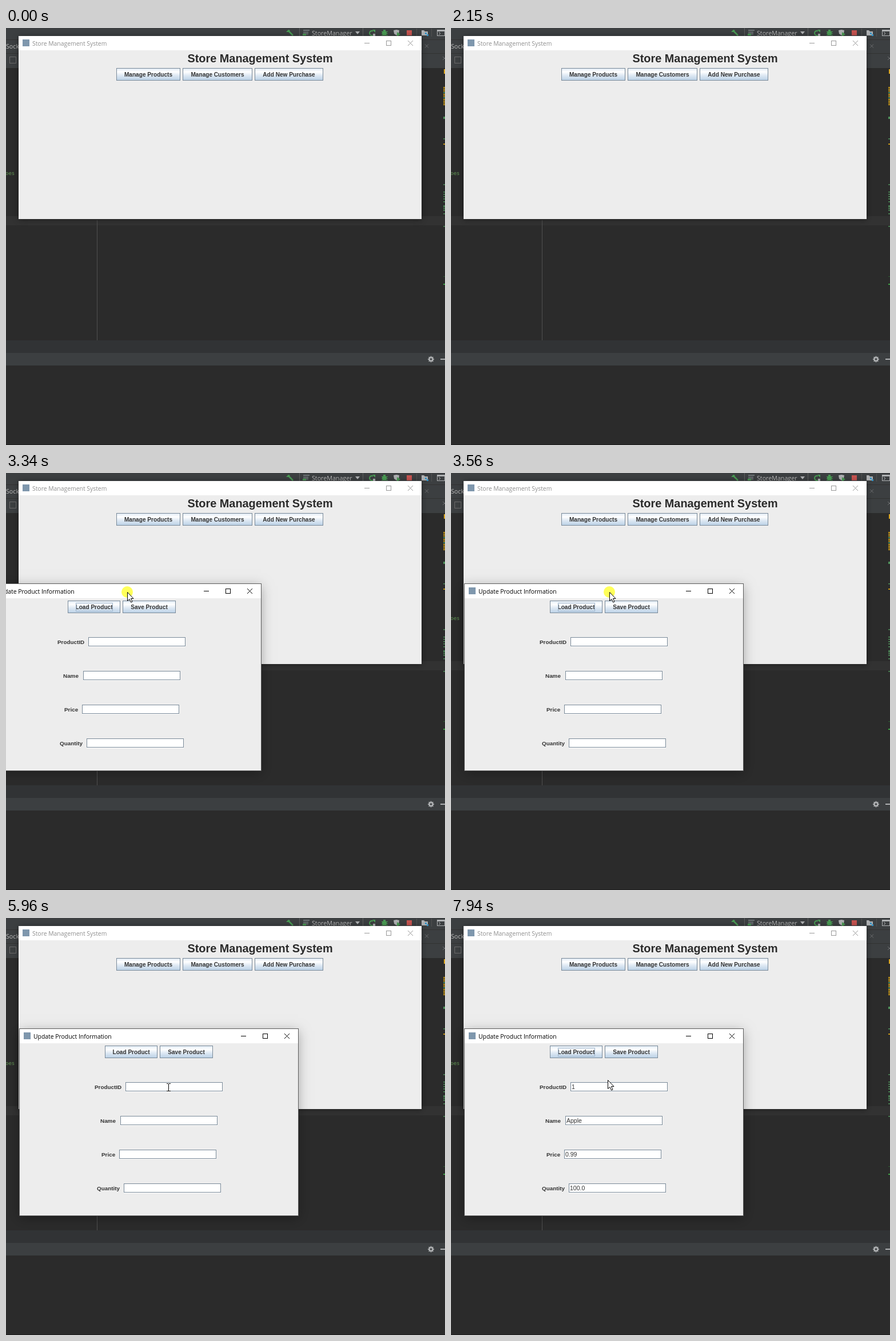
Animation, 768 px wide and 729 px high, one loop 8000 ms. Source, as an HTML page with a canvas:

```html
<!DOCTYPE html>
<html lang="en">
<head>
<meta charset="utf-8">
<title>Store Management System</title>
<style>
html, body { margin: 0; width: 100%; height: 100%; overflow: hidden; background: #2b2b2b; }
canvas { display: block; }
</style>
</head>
<body>
<canvas id="stage" width="768" height="729"></canvas>
<script>
const ctx = document.getElementById('stage').getContext('2d');
const LOOP = 8000;
const SANS = '"Open Sans", sans-serif';
const ARIAL = '"Liberation Sans", Arial, sans-serif';

// time, shape, x, y (tip of the arrow, centre of the beam)
const POINTER = [
  [0, ''],
  [180, 'beam', 485, 460], [280, 'beam', 468, 416],
  [480, 'beam', 398, 350], [600, 'arrow', 292, 254], [710, 'arrow', 229, 212],
  [920, 'arrow', 234, 187], [1030, 'arrow', 249, 134], [1140, 'arrow', 263, 89], [1250, 'arrow', 267, 78],
  [1940, 'arrow', 190, 112], [2050, 'beam', 13, 176], [2150, ''],
  [3010, 'arrow', -7, 173], [3130, 'arrow', 109, 208], [3340, 'arrow', 212, 208],
  [3450, 'arrow', 260, 208], [3560, 'arrow', 277, 208],
  [3780, 'arrow', 279, 225], [3880, 'arrow', 282, 252], [3990, 'arrow', 284, 277], [4100, 'beam', 285, 296],
  [6290, 'arrow', 268, 277], [6400, 'arrow', 240, 254], [6510, 'arrow', 220, 239], [6630, 'arrow', 216, 236],
  [7280, 'arrow', 217, 238], [7390, 'arrow', 222, 243], [7500, 'arrow', 234, 252], [7610, 'arrow', 250, 265],
  [7720, 'arrow', 263, 276], [7830, 'arrow', 271, 282], [7940, 'arrow', 274, 283]
];
// time, left, top of the product form
const FORM = [
  [0, -600, 159], [3010, -260, 159], [3130, -144, 194],
  [3340, -41, 194], [3450, 7, 194], [3560, 24, 194]
];

const at = (rows, t) => rows.filter(r => r[0] <= t).pop();
const within = (t, a, b) => t >= a && t < b;

function box(x, y, w, h, color) {
  ctx.fillStyle = color;
  ctx.fillRect(x, y, w, h);
}

function frame(x, y, w, h, color, width = 1) {
  ctx.strokeStyle = color;
  ctx.lineWidth = width;
  ctx.strokeRect(x + 0.5, y + 0.5, w - 1, h - 1);
}

function text(str, x, y, font, color, align = 'left') {
  ctx.font = font;
  ctx.fillStyle = color;
  ctx.textAlign = align;
  ctx.fillText(str, x, y);
}

function path(points, color, width, closed) {
  ctx.beginPath();
  points.forEach(([x, y]) => ctx.lineTo(x, y));
  if (closed) ctx.closePath();
  if (width) {
    ctx.strokeStyle = color;
    ctx.lineWidth = width;
    ctx.stroke();
  } else {
    ctx.fillStyle = color;
    ctx.fill();
  }
}

function disc(x, y, r, color) {
  ctx.fillStyle = color;
  ctx.beginPath();
  ctx.arc(x, y, r, 0, Math.PI * 2);
  ctx.fill();
}

function cross(x, y, r, color) {
  path([[x - r, y - r], [x + r, y + r]], color, 1);
  path([[x + r, y - r], [x - r, y + r]], color, 1);
}

function drawToolbar() {
  const green = '#499c54', grey = '#afb1b3';
  box(0, 0, 768, 70, '#3c3f41');
  box(0, 20, 768, 1, '#323232');
  box(0, 44, 768, 1, '#323232');

  path([[490, 7], [494, 3], [497, 4], [495, 7]], green);
  path([[494, 5], [502, 13]], green, 2.5);

  frame(513, -6, 112, 23, '#5e6060');
  box(520, 3, 11, 2, '#6e7476');
  box(520, 6, 9, 6, '#5c6264');
  box(519, 10, 6, 3, green);
  text('StoreManager', 535, 13, '10.7px ' + SANS, '#bbbbbb');
  path([[611, 6], [619, 6], [615, 11]], grey);

  ctx.strokeStyle = green;
  ctx.lineWidth = 2;
  ctx.beginPath();
  ctx.arc(640, 9, 4, 1.2, 5.2);
  ctx.stroke();
  path([[641, 3], [646, 3], [646, 8]], green);
  box(642, 10, 4, 4, grey);

  disc(662, 9, 4, green);
  for (const y of [6, 9, 12]) box(657, y, 11, 1, green);
  box(660, 3, 4, 2, green);

  path([[678, 4], [683, 3], [688, 4], [687, 10], [683, 13], [679, 10]], grey);
  path([[684, 7], [690, 11], [684, 15]], green);

  box(701, 4, 9, 9, '#c75450');
  box(718, 1, 1, 14, '#515151');
  path([[727, 4], [731, 4], [733, 6], [738, 6], [738, 13], [727, 13]], grey);
  box(733, 8, 3, 3, '#3592c4');
  box(736, 11, 3, 3, '#3592c4');
  box(744, 1, 1, 14, '#515151');
  frame(754, 3, 14, 11, grey);
  box(754, 3, 14, 3, grey);
  path([[757, 7], [760, 9.5], [757, 12]], grey, 1);

  text('Socke', 0, 36, '10.7px ' + SANS, '#bbbbbb');
  frame(6, 50, 12, 12, '#6b6b6b');
  cross(736, 31.5, 3, '#6e7072');
  cross(767, 53, 3, '#6e7072');
}

function drawEditor() {
  box(0, 70, 768, 476, '#2b2b2b');
  box(0, 329, 768, 16, '#323232');
  box(159, 336, 1, 210, '#505050');
  text('oes', -1, 257, '9px "DejaVu Sans Mono", monospace', '#629755');

  const orange = '#be9117', green = '#4f8f5a';
  box(766, 72, 2, 8, '#d9a520');
  for (let i = 0; i < 11; i++) box(765, 103 + i * 3, 3, 2, i === 3 || i === 6 ? green : orange);
  box(765, 155, 3, 4, green);
  box(765, 202, 3, 2, orange);
  for (const y of [193, 273, 286, 290, 294, 298, 303, 310, 312, 315, 318, 324, 346]) box(765, y, 3, 1.5, green);
  box(765, 434, 3, 1, '#2f5f35');
  box(765, 447, 3, 2, '#3fa045');

  box(0, 546, 768, 22, '#313335');
  box(0, 568, 768, 22, '#3c3f41');
  box(0, 590, 768, 139, '#2b2b2b');
  box(0, 728, 768, 1, '#1c1c1c');

  for (let i = 0; i < 4; i++) {
    const a = i * Math.PI / 4, c = Math.cos(a) * 5.3, s = Math.sin(a) * 5.3;
    path([[743.5 - c, 579 - s], [743.5 + c, 579 + s]], '#afb1b3', 2);
  }
  disc(743.5, 579, 4, '#afb1b3');
  disc(743.5, 579, 1.8, '#3c3f41');
  box(760, 578, 8, 2, '#afb1b3');
}

function drawWindow(x, y, w, h, title, active) {
  ctx.save();
  ctx.shadowColor = active ? 'rgba(0,0,0,.32)' : 'rgba(0,0,0,.4)';
  ctx.shadowBlur = active ? 20 : 10;
  ctx.shadowOffsetY = active ? 4 : 1;
  box(x, y, w, h, '#ededed');
  ctx.restore();
  box(x, y, w, 25, '#ffffff');
  if (active) frame(x - 1, y - 1, w + 2, h + 2, '#5c5c5c');

  const ink = active ? '#000000' : '#999999';
  box(x + 7, y + 6, 12, 12, '#7f97ad');
  text(title, x + 24, y + 17, '10.4px ' + SANS, active ? '#000000' : '#8f8f8f');
  const r = x + w;
  box(r - 100, y + 12, 9, 1, ink);
  frame(r - 62, y + 8, 9, 9, ink);
  cross(r - 19.5, y + 12.5, 4.5, ink);
}

function drawButton(x, y, w, label, { hover, pressed, focus } = {}) {
  const h = 22;
  const fill = ctx.createLinearGradient(0, y, 0, y + h);
  [[0, '#dde8f3'], [0.3, '#ffffff'], [0.6, '#dde8f3'], [1, '#b8cfe5']].forEach(s => fill.addColorStop(...s));
  box(x, y, w, h, pressed ? '#b8cfe5' : fill);
  frame(x, y, w, h, '#7a8a99');
  if (hover) {
    frame(x, y, w, h, '#8499b0');
    frame(x + 1, y + 1, w - 2, h - 2, '#8ea9c6');
  }
  text(label, x + w / 2, y + 15, 'bold 10.1px ' + ARIAL, '#333333', 'center');
  if (focus) frame(x + 14, y + 4, w - 27, 15, '#9db4cc');
}

function drawField(label, labelX, x, y, value) {
  text(label, labelX, y + 12, 'bold 9.9px ' + ARIAL, '#333333');
  box(x, y, 170, 17, '#ffffff');
  frame(x, y, 170, 16, '#7a8a99');
  text(value, x + 2, y + 12, '10.5px ' + ARIAL, '#333333');
}

function drawMain(t) {
  drawWindow(22, 14, 705, 320, 'Store Management System', within(t, 1600, 1690));
  text('Store Management System', 444.5, 60, 'bold 19.9px ' + ARIAL, '#2b2b2b', 'center');
  drawButton(193, 70, 112, 'Manage Products', { hover: within(t, 1140, 1940), pressed: within(t, 1600, 1690) });
  drawButton(309, 70, 122, 'Manage Customers');
  drawButton(435, 70, 120, 'Add New Purchase');
}

function drawForm(t) {
  const [, left, top] = at(FORM, t);
  const loaded = t >= 6740;
  ctx.save();
  ctx.translate(left, top);
  drawWindow(0, 0, 487, 326, 'Update Product Information', true);
  drawButton(149, 29, 92, 'Load Product', {
    hover: within(t, 6510, 7500),
    pressed: within(t, 6630, 6740),
    focus: t < 4420 || t >= 6630
  });
  drawButton(245, 29, 93, 'Save Product');
  drawField('ProductID', 131, 185, 93, t >= 6170 ? '1' : '');
  drawField('Name', 141, 176, 152, loaded ? 'Apple' : '');
  drawField('Price', 143, 174, 211, loaded ? '0.99' : '');
  drawField('Quantity', 135, 182, 270, loaded ? '100.0' : '');
  if (within(t, 4420, 4880) || within(t, 5430, 5960)) box(187, 94, 1, 14, '#333333');
  ctx.restore();
}

function drawPointer(t) {
  const [, shape, x, y] = at(POINTER, t);
  if (within(t, 1600, 1690) || within(t, 3010, 3670)) disc(x, y, 10, 'rgba(255,255,0,.65)');
  if (shape === 'arrow') {
    const points = [[0, 0], [0, 15], [3.5, 12], [6, 17.5], [8.5, 16.5], [6, 11], [10.5, 11]]
      .map(([px, py]) => [x + px + 0.5, y + py + 0.5]);
    path(points, '#ffffff', 0, true);
    path(points, '#000000', 1, true);
  } else if (shape === 'beam') {
    const ink = t < 3000 ? '#d4d4d4' : '#000000';
    box(x - 1, y - 6, 1, 13, ink);
    for (const edge of [y - 7, y + 6]) {
      box(x - 4, edge, 3, 1, ink);
      box(x, edge, 3, 1, ink);
    }
  }
}

function draw(now) {
  const t = now % LOOP;
  drawToolbar();
  drawEditor();
  drawMain(t);
  if (t >= 3010) drawForm(t);
  drawPointer(t);
}

let start;
function tick(now) {
  start ??= now;
  draw(now - start);
  requestAnimationFrame(tick);
}
requestAnimationFrame(tick);
</script>
</body>
</html>
```
